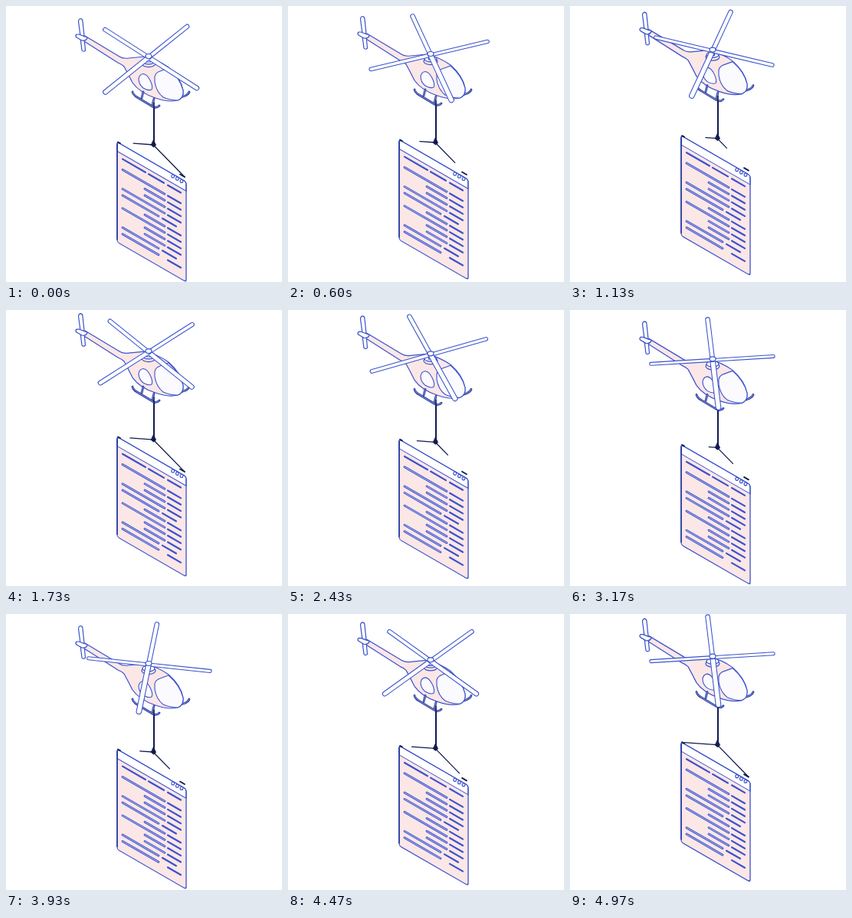
Write an HTML page with a canvas that moves like this. It is 360x360 px and loops after 5000 ms.

```html
<!DOCTYPE html>
<html>
<head>
<meta charset="utf-8">
<style>
html, body { margin: 0; width: 100%; height: 100%; overflow: hidden; background: #fff; }
canvas { display: block; width: 360px; height: 360px; }
</style>
</head>
<body>
<canvas id="stage" width="360" height="360"></canvas>
<script>
const ctx = document.getElementById('stage').getContext('2d');
const BLUE = '#3a52cc', DEEP = '#22359c', NAVY = '#111a4d';
const PINK = '#fce7e7', WHITE = '#fff', GLASS = '#fbfbff', LILAC = '#c3c9f2';
const LOOP = 5000, FPS = 30, CYCLE = 3600, TAU = Math.PI * 2;

function shape(d, fill, stroke = BLUE, width = 1.2) {
  const p = new Path2D(d);
  if (fill) { ctx.fillStyle = fill; ctx.fill(p); }
  if (stroke) { ctx.strokeStyle = stroke; ctx.lineWidth = width; ctx.stroke(p); }
}

function line(x1, y1, x2, y2, color, width) {
  ctx.strokeStyle = color;
  ctx.lineWidth = width;
  ctx.beginPath();
  ctx.moveTo(x1, y1);
  ctx.lineTo(x2, y2);
  ctx.stroke();
}

function oval(x, y, rx, ry, fill, width = 1.2) {
  ctx.beginPath();
  ctx.ellipse(x, y, rx, ry, 0, 0, TAU);
  ctx.fillStyle = fill;
  ctx.fill();
  ctx.strokeStyle = BLUE;
  ctx.lineWidth = width;
  ctx.stroke();
}

// Linear interpolation through [time, value] pairs
function track(keys, t) {
  for (let i = 1; i < keys.length; i++) {
    const [t0, a] = keys[i - 1], [t1, b] = keys[i];
    if (t <= t1) return a + (b - a) * (t - t0) / (t1 - t0);
  }
  return keys[keys.length - 1][1];
}

// Each row of the page: bars as [from, to, outlined]
const RIGHT = [211, 228, 0];
const MID = [[181, 207, 1], RIGHT];
const LONG = [[152, 207, 1], RIGHT];
const SPLIT = [[152, 199, 1], [204, 222, 0]];
const ROWS = [
  [[152, 182, 0], [186, 206, 0], RIGHT],
  LONG, MID, MID, LONG, SPLIT,
  MID, LONG, MID, MID, SPLIT,
  [[152, 199, 1], RIGHT]
];

function page() {
  const slope = 0.577;
  ctx.save();
  ctx.transform(1, slope, 0, 1, 145, 177.4);
  shape('M3 0H87Q90 0 90 3V127.5Q90 130.5 87 130.5H3Q0 130.5 0 127.5V3Q0 0 3 0Z', PINK, null);
  shape('M3 0H87Q90 0 90 3V12H0V3Q0 0 3 0Z', WHITE, BLUE, 1.1);
  shape('M3 0H87Q90 0 90 3V127.5Q90 130.5 87 130.5H3Q0 130.5 0 127.5V3Q0 0 3 0Z', null, BLUE, 1.3);
  line(0, 3, 0, 127, DEEP, 1.5);
  ctx.restore();

  for (const x of [217.7, 223.4, 229]) oval(x, 222 + (x - 217.7) * slope, 1.9, 2, WHITE, 1.1);

  // A wider gap follows the title row
  ROWS.forEach((row, i) => {
    const top = i ? 209.4 + (i - 1) * 8.4 : 195.6;
    const y = x => top + (x - 145) * slope;
    for (const [a, b, outlined] of row) {
      line(a, y(a), b, y(b), BLUE, outlined ? 2.8 : 2.2);
      if (outlined) line(a, y(a), b, y(b), LILAC, 0.9);
    }
  });
}

const LEFT_REACH = [[0, .6], [1130, .35], [1730, .7], [2430, .55], [3170, .25], [3930, .4], [4970, 1]];
const RIGHT_REACH = [[0, 1], [1130, .3], [1730, 1], [2430, .4], [3170, .5], [3930, .52], [4970, 1]];

function ropes(t) {
  const l = track(LEFT_REACH, t), r = track(RIGHT_REACH, t);
  line(193, 133, 193, 181, NAVY, 2);
  line(192, 181, 192 - 43 * l, 181 - 3 * l, NAVY, 1.3);
  line(192, 181, 192 + 41 * r, 181 + 42 * r, NAVY, 1.3);
  shape('M192.5 175L195.5 181.5L192.5 184L189.5 181.5Z', NAVY, NAVY, 1);
  // fixings at the page corners
  line(146, 177.5, 149, 179, NAVY, 1.8);
  line(227, 219.5, 233, 223, NAVY, 1.8);
}

function body() {
  // far skid
  shape('M228 119L234 117Q238 115 239 112', null, DEEP, 2.8);
  shape('M228 119L234 117Q238 115 239 112', null, LILAC, 0.7);
  // fuselage and boom
  shape('M103 39L148 66Q152 69 160 68L181 66Q198 70 212 80Q228 94 231 110Q232 120 224 123' +
    'Q212 126 195 120Q174 113 165 100Q159 88 154 79Q151 76 146 74L102 46Z', PINK);
  // windows
  shape('M194 92Q195 87 201 85L212 81Q227 94 231 110Q232 120 224 123Q214 123 205 119Q196 112 194 99Z', GLASS, BLUE, 1.1);
  shape('M173 95Q174 89 179 88.5Q184 89 188 97Q192 105 190 109Q186 111 179 107Q173 102 173 95Z', GLASS, BLUE, 1.1);
  // near skid
  for (const [w, c] of [[2.8, DEEP], [0.7, LILAC]]) {
    shape('M179 112L177 120M193 121L191 129', null, c, w);
    shape('M165 112Q166 116 171 119L191 131Q196 134 200 130', null, c, w);
  }
  line(193, 126, 193, 133, NAVY, 1.6);
  // tail
  shape('M97 39L94.5 20Q95 16.5 97.5 16.5Q100 17 100 20L102 39Z', WHITE);
  shape('M97 42L99 58Q101 60.5 103.5 58L102 42Z', WHITE);
  shape('M92 37Q90 39 92 41L99 45Q104 46 106 42Q106 40 103 40L95 37Z', WHITE);
  // mast
  oval(186, 75, 9, 4.6, PINK);
  oval(186, 72, 8, 3.8, WHITE);
  shape('M183.5 65V73H188.5V65Z', WHITE, BLUE, 1.1);
}

function rotor(t) {
  const start = 41.7 / 360 - t / CYCLE;
  const arms = [0, 1, 2, 3].map(i => {
    const a = (start + i / 4) * TAU, s = Math.sin(a);
    const depth = 1 / (1 - 0.076 * s);
    return { x: 186 + 80 * Math.cos(a) * depth, y: 67 + 57.2 * s * depth, w: (4.8 + 2.3 * Math.abs(s)) * depth };
  });
  const pair = i => {
    for (const [c, cut] of [[BLUE, 0], [WHITE, 2.1]])
      for (const arm of [arms[i], arms[i + 2]]) line(186, 67, arm.x, arm.y, c, arm.w - cut);
  };
  pair(0);
  pair(1);
  oval(186, 65.5, 4, 3, WHITE);
}

function draw(t) {
  ctx.setTransform(1, 0, 0, 1, 0, 0);
  ctx.fillStyle = WHITE;
  ctx.fillRect(0, 0, 360, 360);
  ctx.lineCap = ctx.lineJoin = 'round';
  ctx.translate(0, 6 * Math.cos(t / CYCLE * TAU) - 6);
  page();
  ropes(t);
  body();
  rotor(t);
}

const begin = performance.now();
function tick() {
  const t = (performance.now() - begin) % LOOP;
  const step = Math.min(LOOP * FPS / 1000 - 1, Math.floor((t + 4) * FPS / 1000));
  draw(step * 1000 / FPS);
  requestAnimationFrame(tick);
}
tick();
</script>
</body>
</html>
```
